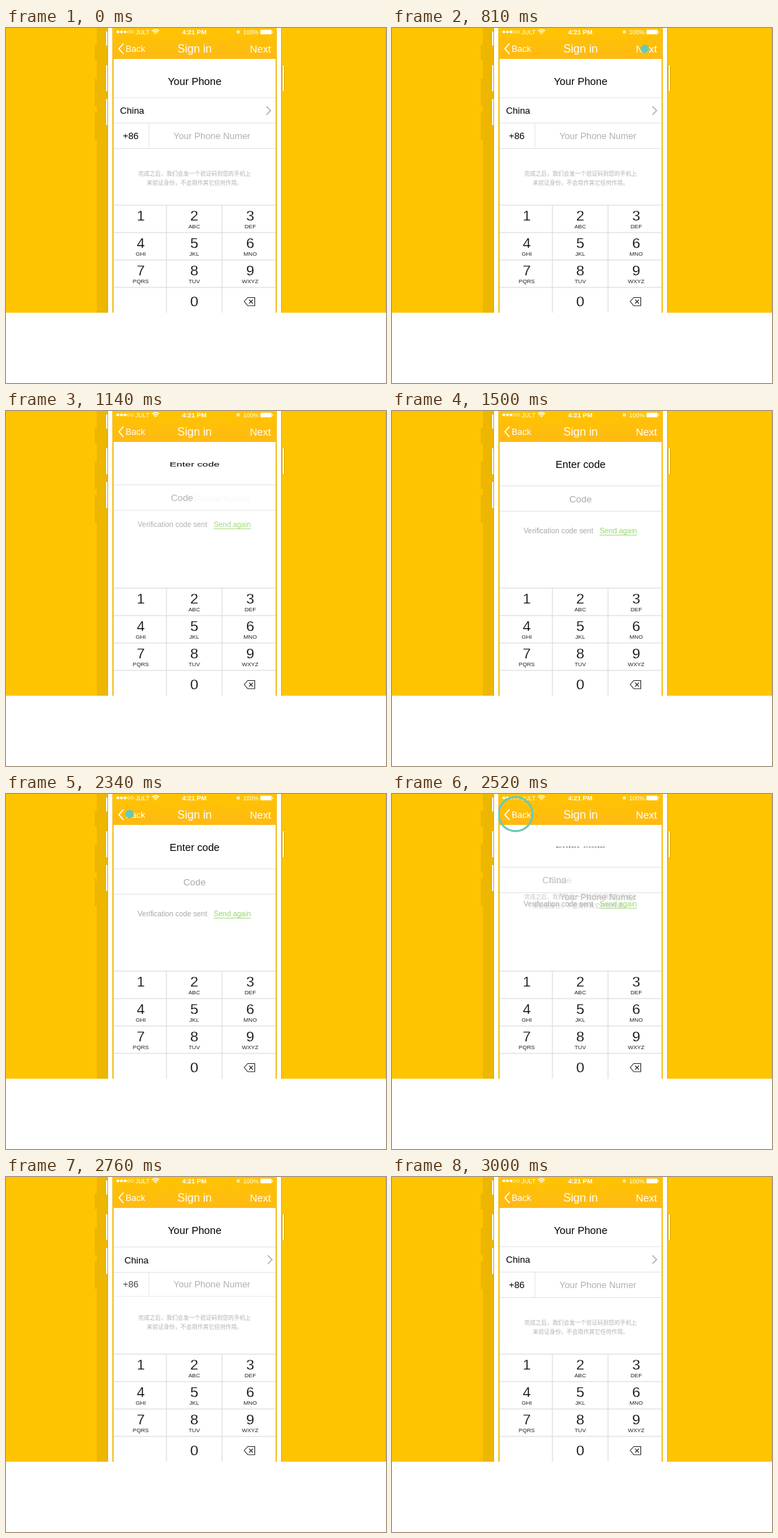
An HTML page with a canvas that plays this animation: 540 px wide and 505 px high, repeating every 3330 ms.

```html
<!DOCTYPE html>
<html lang="zh-Hans">
<head>
<meta charset="utf-8">
<title>Sign in</title>
<style>
html, body { margin: 0; width: 100%; height: 100%; overflow: hidden; background: #fff; }
canvas { display: block; width: 540px; height: 505px; }
</style>
</head>
<body>
<canvas id="stage" width="540" height="505"></canvas>
<script>
const ctx = document.getElementById('stage').getContext('2d');
const LOOP = 3330, STEP = 30, TO_CODE = 810, TO_PHONE = 2340;
const YELLOW = '#ffc400', GREY = '#b0b0b0', RULE = '#e3e3e3', TEAL = '#69c9b4';
const SANS = '"Liberation Sans", Arial, sans-serif';
const CJK = '"Noto Sans CJK SC", "Noto Sans CJK", sans-serif';

const header = ctx.createLinearGradient(0, 0, 0, 44);
header.addColorStop(0, '#ffc400');
header.addColorStop(1, '#ffb914');

const clamp = v => Math.max(0, Math.min(1, v));

// Cubic Bezier timing curve, solved by bisection.
function ease(x) {
  if (x <= 0) return 0;
  if (x >= 1) return 1;
  const curve = (u, a, b) => 3 * (1 - u) ** 2 * u * a + 3 * (1 - u) * u * u * b + u ** 3;
  let low = 0, high = 1;
  for (let i = 0; i < 24; i++) {
    const mid = (low + high) / 2;
    if (curve(mid, 0.3, 0.15) < x) low = mid; else high = mid;
  }
  return curve(low, 0.05, 1);
}

function rect(x, y, w, h, color) {
  ctx.fillStyle = color;
  ctx.fillRect(x, y, w, h);
}

function faded(alpha, draw) {
  if (alpha <= 0) return;
  ctx.save();
  ctx.globalAlpha = alpha;
  draw();
  ctx.restore();
}

// A white stroke over the glyphs gives a lighter weight.
function text(str, x, y, size, color, { align = 'left', weight = '', family = SANS, thin = 0 } = {}) {
  ctx.font = `${weight} ${size}px ${family}`;
  ctx.textAlign = align;
  ctx.fillStyle = color;
  ctx.fillText(str, x, y);
  if (thin) {
    ctx.strokeStyle = '#fff';
    ctx.lineWidth = thin;
    ctx.lineJoin = 'round';
    ctx.strokeText(str, x, y);
  }
}

function path(points, color, width, closed) {
  ctx.beginPath();
  points.forEach(([x, y]) => ctx.lineTo(x, y));
  if (closed) ctx.closePath();
  ctx.strokeStyle = color;
  ctx.lineWidth = width;
  ctx.lineJoin = 'miter';
  ctx.stroke();
}

function disc(x, y, r, color) {
  ctx.beginPath();
  ctx.arc(x, y, r, 0, Math.PI * 2);
  ctx.fillStyle = color;
  ctx.fill();
}

function ring(x, y, r, width, color) {
  ctx.beginPath();
  ctx.arc(x, y, r - width / 2, 0, Math.PI * 2);
  ctx.strokeStyle = color;
  ctx.lineWidth = width;
  ctx.stroke();
}

function button(x, y, h) {
  ctx.beginPath();
  ctx.roundRect(x, y, 3, h, 1.2);
  ctx.fillStyle = '#fff';
  ctx.fill();
  ctx.strokeStyle = '#e0aa00';
  ctx.lineWidth = 1;
  ctx.stroke();
}

function drawPhone() {
  rect(0, 0, 540, 505, '#fff');
  rect(0, 0, 540, 405, YELLOW);
  rect(539, 0, 1, 405, '#eab400');
  const buttons = [[4, 22], [52, 39], [100, 39]];
  rect(129, 0, 16, 405, '#edb600');
  buttons.forEach(([y, h]) => rect(126, y + 20, 3, h, '#edb600'));
  buttons.forEach(([y, h]) => button(141.5, y + 0.5, h - 1));
  button(392.5, 52.5, 38);
  rect(144, 0, 248, 405, '#e0aa00');
  rect(145, 0, 246, 405, '#fff');
  rect(151, 0, 2, 405, '#f3c127');
  rect(383, 0, 2, 405, '#f3c127');
  rect(153, 0, 230, 405, '#fff');
}

function drawStatusBar() {
  for (let i = 0; i < 5; i++) {
    const x = 159 + i * 5.1;
    if (i < 3) disc(x, 5.5, 2.1, '#fff');
    else ring(x, 5.5, 2.2, 0.7, '#fff');
  }
  text('JULT', 184, 9, 8.6, '#fff');
  [2, 4.5, 7].forEach(r => {
    ctx.beginPath();
    ctx.arc(212.5, 9.3, r, -Math.PI * 0.75, -Math.PI * 0.25);
    ctx.strokeStyle = '#fff';
    ctx.lineWidth = 1.4;
    ctx.stroke();
  });
  text('4:21 PM', 267.5, 9, 9.2, '#fff', { align: 'center', weight: 'bold' });
  disc(330, 5.5, 2.5, '#ffe9a8');
  text('100%', 337, 9, 8.6, '#fff');
  ctx.beginPath();
  ctx.roundRect(361.5, 2.5, 16, 6.5, 1.2);
  ctx.fillStyle = '#fff';
  ctx.fill();
  rect(378.3, 4.5, 1, 2.5, '#fff');
}

function drawHeader() {
  rect(152, 0, 232, 44, header);
  drawStatusBar();
  path([[167, 22], [160.5, 29.5], [167, 37]], '#fff', 1.6);
  text('Back', 170, 34, 12.5, '#fff');
  text('Sign in', 268, 35, 16, '#fff', { align: 'center' });
  text('Next', 376.5, 35, 14.6, '#fff', { align: 'right' });
}

function drawKeypad() {
  [252, 291, 330, 369].forEach(y => rect(153, y - 0.5, 230, 1, '#d8d8d8'));
  [228, 307].forEach(x => rect(x - 0.5, 252, 1, 153, '#d8d8d8'));
  const columns = [191.5, 267.5, 347];
  const letters = ['', 'ABC', 'DEF', 'GHI', 'JKL', 'MNO', 'PQRS', 'TUV', 'WXYZ'];
  const digit = (n, x, y) => text(n, x, y, 20.8, '#000', { align: 'center', thin: 0.3 });
  letters.forEach((label, i) => {
    const x = columns[i % 3], y = 274 + Math.floor(i / 3) * 38.8;
    digit(i + 1, x, y);
    text(label, x, y + 11, 8.1, '#222', { align: 'center' });
  });
  digit(0, columns[1], 396);
  path([[338.5, 389], [343.5, 383.5], [353.5, 383.5], [353.5, 395], [343.5, 395]], '#333', 1.1, true);
  path([[345.5, 386.5], [350.8, 392]], '#333', 1.1);
  path([[350.8, 386.5], [345.5, 392]], '#333', 1.1);
}

function drawTitle(time, forward) {
  const names = forward ? ['Your Phone', 'Enter code'] : ['Enter code', 'Your Phone'];
  const leaving = time < 205;
  const scale = leaving
    ? Math.cos(clamp((time - 30) / 165) * Math.PI / 2)
    : Math.sin(clamp((time - 215) / 245) * Math.PI / 2);
  if (scale < 0.01) return;
  ctx.save();
  ctx.translate(268, 75.5);
  ctx.scale(1, scale);
  text(names[leaving ? 0 : 1], 0, 5.3, 14.7, '#000', { align: 'center' });
  ctx.restore();
}

function drawForm(time, forward) {
  const f = ease((time - 55) / 580);
  const code = forward ? f : 1 - f;
  const phone = 1 - code;
  const coming = clamp(1.3 * f - 0.15), going = clamp(1 - 1.9 * f);
  const countryAlpha = forward ? going : coming;
  const noteAlpha = forward ? going : clamp(2.4 * f);
  const numberAlpha = forward ? clamp(1 - 1.1 * f) : clamp(2.8 * f);
  const prefixAlpha = forward ? going : clamp((f - 0.7) / 0.3);
  const codeAlpha = forward ? coming : going;
  const sentAlpha = forward ? coming : clamp(1.5 - 1.7 * f);
  const rowY = 158.3 - (forward ? 36 : 11) * code;
  const lineA = 98.5 + 7.5 * code, lineB = 134.7 + 7.5 * code, lineC = 171 - 20 * code;

  drawTitle(time, forward);
  rect(153, lineA, 230, 1, RULE);
  rect(153, lineB, 230, 1, RULE);
  faded(prefixAlpha, () => {
    rect(153, lineC, 230, 1, RULE);
    rect(202.5, lineB, 1, lineC - lineB, RULE);
    text('+86', 166, rowY, 13.2, '#000');
  });
  faded(countryAlpha, () => text('China', 162 + 75 * code, 122 + 7 * code, 13.2, '#000'));
  faded(noteAlpha, () => {
    text('完成之后，我们会发一个验证码到您的手机上', 188, 210.2 - 89 * code, 8, GREY, { family: CJK });
    text('来验证身份，不会用作其它任何作用。', 200, 222.9 - 89 * code, 8, GREY, { family: CJK });
  });
  const arrow = 25 * code;
  path([[370 + arrow, 111.5], [376 + arrow, 117.5], [370 + arrow, 123.5]], GREY, 1.6);
  faded(numberAlpha, () => text('Your Phone Numer', 238, rowY, 12.9, GREY));
  faded(codeAlpha, () => text('Code', 252 - 90 * phone, 129.5 - 7 * phone, 13.3, '#aaa'));
  faded(sentAlpha, () => {
    const y = 174 - 45 * phone;
    text('Verification code sent', 187, y, 10.4, '#a8a8a8');
    text('Send again', 295, y, 10.5, '#93d868');
    rect(295, y + 2, 53, 1, '#a5dc80');
  });
}

function drawTouch(time, x, y) {
  const p = time / 270;
  if (p < 0 || p >= 1) return;
  const r = 6 + 22.6 * Math.sin(p * Math.PI / 2);
  ring(x, y, r, r * (1 - p) ** 2, TEAL);
}

function render(now) {
  const t = Math.floor((now % LOOP) / STEP) * STEP;
  const forward = t >= TO_CODE && t < TO_PHONE;
  const time = forward ? t - TO_CODE : t < TO_CODE ? LOOP : t - TO_PHONE;
  drawPhone();
  ctx.save();
  ctx.beginPath();
  ctx.rect(151, 0, 234, 405);
  ctx.clip();
  drawForm(time, forward);
  drawKeypad();
  drawHeader();
  if (forward) drawTouch(time, 359, 29.7);
  else drawTouch(time, 175.6, 28.6);
  ctx.restore();
}

const start = performance.now();
function tick() {
  render(performance.now() - start);
  requestAnimationFrame(tick);
}
tick();
</script>
</body>
</html>
```
